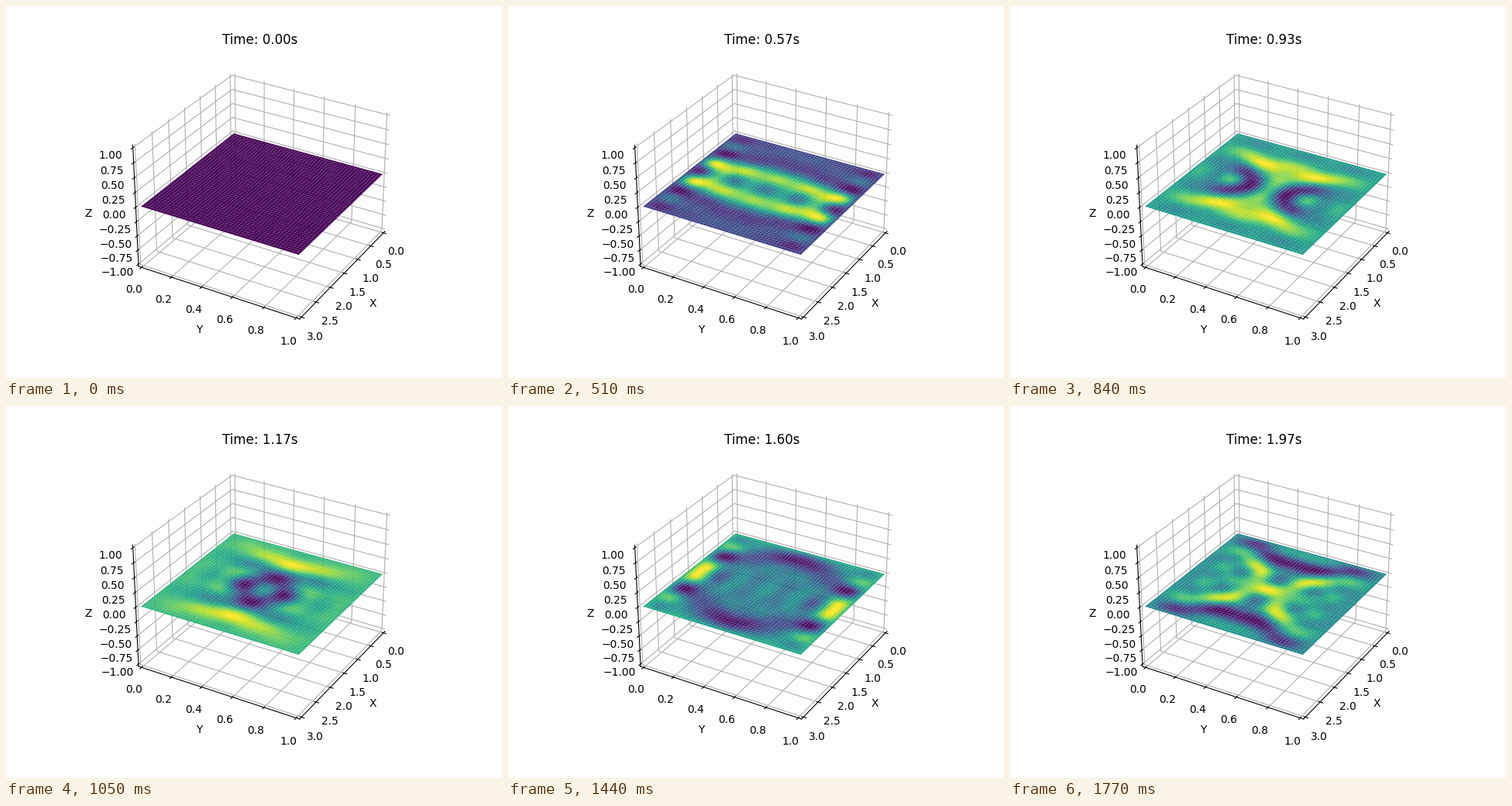
A matplotlib script that plays this animation: 640x480 px, repeating every 1.8 s.

```python
import numpy as np
import matplotlib.pyplot as plt
from matplotlib.animation import FuncAnimation

FRAMES, INTERVAL, FPS = 60, 30, 30
LX, LY, SPEED = 3.0, 1.0, 1.0
MODES, POINTS, GAIN = 10, 50, 1e-3

x = np.linspace(0, LX, POINTS)
y = np.linspace(0, LY, POINTS)
X, Y = np.meshgrid(x, y)

# Membrane struck at its centre: truncated sum of sine modes
k = np.arange(1, MODES + 1)
shape_x = np.sin(np.outer(k, np.pi * x / LX))
shape_y = np.sin(np.outer(k, np.pi * y / LY))
strike = np.outer(np.sin(k * np.pi / 2), np.sin(k * np.pi / 2))
omega = SPEED * np.pi * np.hypot(k[:, None] / LY, k[None, :] / LX)


def height(t):
    weights = GAIN * strike * np.sin(omega * t) / omega
    return shape_y.T @ weights @ shape_x


def face_means(z):
    return (z[:-1, :-1] + z[1:, :-1] + z[:-1, 1:] + z[1:, 1:]).ravel() / 4


def padded(lo, hi):
    pad = (hi - lo) / 48
    return lo - pad, hi + pad


fig = plt.figure(figsize=(6.4, 4.8), dpi=100, facecolor="#fdfdfd")
ax = fig.add_subplot(projection="3d", facecolor="#fdfdfd")
ax.view_init(elev=30, azim=30)
surface = ax.plot_surface(X, Y, np.zeros_like(X), cmap="viridis")

ax.set_xlim(*padded(0, LX))
ax.set_ylim(*padded(0, LY))
ax.set_zlim(*padded(-1, 1))
ax.set(xlabel="X", ylabel="Y", zlabel="Z")
for axis in (ax.xaxis, ax.yaxis, ax.zaxis):
    axis.set_pane_color((1, 1, 1, 0))


def update(i):
    t = i / FPS
    # The swing is far below a pixel, so only the colours change
    means = face_means(height(t))
    surface.set_array(means)
    surface.set_clim(means.min(), means.max())
    ax.set_title(f"Time: {t:.2f}s")
    return (surface,)


anim = FuncAnimation(fig, update, frames=FRAMES, interval=INTERVAL,
                     repeat=True, repeat_delay=0, blit=False)
plt.show()
```
